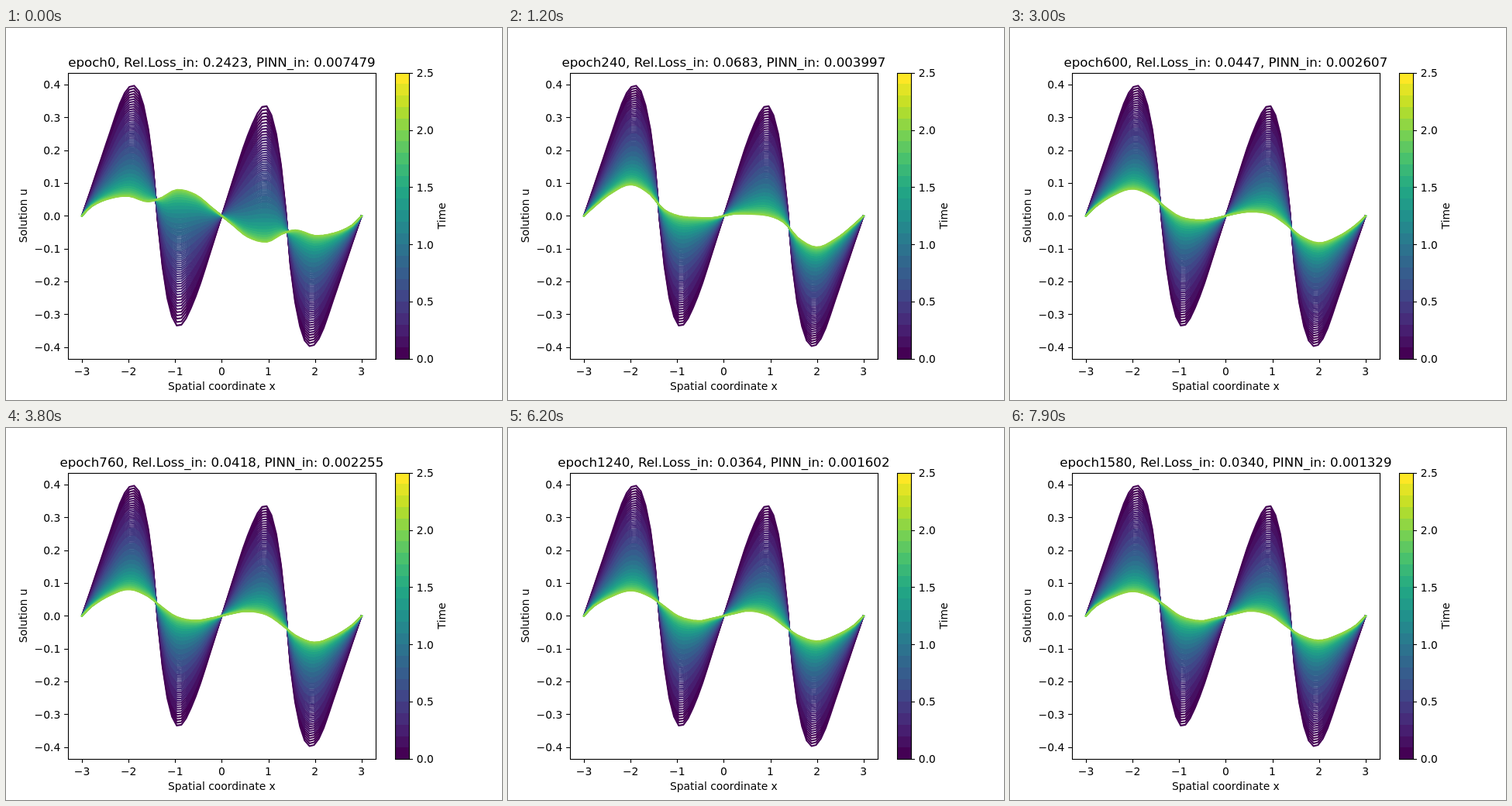
Animation of 640 by 480 pixels, one loop 8 s. Source, as an HTML page with a canvas:

```html
<!DOCTYPE html>
<html lang="en">
<head>
<meta charset="utf-8">
<title>Training progress</title>
<style>
  html, body { margin: 0; width: 100%; height: 100%; overflow: hidden; background: #fff; }
  canvas { display: block; }
</style>
</head>
<body>
<canvas id="stage" width="640" height="480"></canvas>
<script>
const ctx = document.getElementById('stage').getContext('2d');
const FONT = '"DejaVu Sans", sans-serif';
const BOX = { l: 80, r: 476.8, t: 57.6, b: 427.2 };
const BAR = { l: 501.6, r: 520.1 };
const MID_X = 278.4, MID_Y = 242.4, X_UNIT = 60.12, Y_UNIT = 423.2;
const POINTS = 60, LINES = 100, LEVELS = 25, DECAY = 1.15;
const STEPS = 80, STEP_MS = 100;

// Left half of the start wave, in pixels above zero; the right half mirrors it.
const START = [0, 18, 36, 54.5, 72.5, 91, 109, 127.5, 145, 158.5, 166.5, 168, 161, 142.5, 112,
  65, -8, -66, -106, -130, -141.5, -140.5, -132, -119, -104, -87, -68, -48.5, -29, -9.5];

// Learned end wave at chosen steps, given at the KNOTS positions.
const KNOTS = [98, 110, 132, 158, 182, 200, 220, 245, 265, 278.4];
const STAGES = [
  { step: 0,  loss: 0.2423, pinn: 0.007479, end: [0, 12, 22, 25.5, 18.5, 23, 33.5, 27, 11, 0] },
  { step: 12, loss: 0.0683, pinn: 0.003997, end: [0, 11, 28.5, 40.5, 29, 9, 0, -2.5, -2.5, 0] },
  { step: 19, loss: 0.0562, pinn: 0.003408, end: [0, 12, 28, 37.5, 26.5, 9, -2, -4, -2.5, 0] },
  { step: 30, loss: 0.0447, pinn: 0.002607, end: [0, 11.5, 26, 35, 26, 11.5, -1.5, -5.5, -3, 0] },
  { step: 46, loss: 0.0390, pinn: 0.001950, end: [0, 12, 25, 33.5, 26, 13, -1, -6.5, -3, 0] },
  { step: 62, loss: 0.0364, pinn: 0.001602, end: [0, 12, 24.5, 32.7, 25.5, 13.5, -0.5, -6.5, -3, 0] },
  { step: 79, loss: 0.0340, pinn: 0.001329, end: [0, 12, 24, 31.7, 25, 13.5, -0.5, -6.5, -3, 0] }
];

const VIRIDIS = ['440154', '482475', '414487', '355f8d', '2a788e', '21918c',
  '22a884', '44bf70', '7ad151', 'bddf26', 'fde725']
  .map(h => [0, 2, 4].map(i => parseInt(h.slice(i, i + 2), 16)));

const mix = (a, b, k) => a + (b - a) * k;
const snap = v => Math.floor(v + 0.5) + 0.5;
const px = x => MID_X + x * X_UNIT;
const py = u => MID_Y - u * Y_UNIT;

function color(level) {
  const v = level / (LEVELS - 1) * 10, i = Math.min(9, Math.floor(v));
  return `rgb(${VIRIDIS[i].map((c, j) => Math.round(mix(c, VIRIDIS[i + 1][j], v - i)))})`;
}

// Cubic Hermite curve through the knots.
function curve(ys, x) {
  const n = KNOTS.length;
  const slope = i => {
    const a = Math.max(0, i - 1), b = Math.min(n - 1, i + 1);
    return (ys[b] - ys[a]) / (KNOTS[b] - KNOTS[a]);
  };
  let i = 0;
  while (i < n - 2 && x > KNOTS[i + 1]) i++;
  const h = KNOTS[i + 1] - KNOTS[i], s = (x - KNOTS[i]) / h, r = 1 - s;
  return ys[i] * (1 + 2 * s) * r * r + slope(i) * h * s * r * r
    + ys[i + 1] * s * s * (3 - 2 * s) - slope(i + 1) * h * s * s * r;
}

function stateAt(step) {
  let i = 0;
  while (i < STAGES.length - 2 && step >= STAGES[i + 1].step) i++;
  const a = STAGES[i], b = STAGES[i + 1];
  let k = (step - a.step) / (b.step - a.step);
  if (i === 0) k = 1 - (1 - k) ** 2;
  const log = (p, q) => p * (q / p) ** k;
  return {
    loss: log(a.loss, b.loss),
    pinn: log(a.pinn, b.pinn),
    end: a.end.map((v, j) => mix(v, b.end[j], k))
  };
}

function text(str, x, y, align = 'center', size = 13.889) {
  ctx.font = `${size}px ${FONT}`;
  ctx.textAlign = align;
  ctx.fillStyle = '#000';
  ctx.fillText(str, x, y);
}

function upright(str, x, y) {
  ctx.save();
  ctx.translate(x, y);
  ctx.rotate(-Math.PI / 2);
  text(str, 0, 0);
  ctx.restore();
}

function line(x1, y1, x2, y2) {
  ctx.beginPath();
  ctx.moveTo(x1, y1);
  ctx.lineTo(x2, y2);
  ctx.stroke();
}

function frame(l, r) {
  const x = snap(l), y = snap(BOX.t);
  ctx.strokeRect(x, y, snap(r) - x, snap(BOX.b) - y);
}

function drawWaves(end) {
  const half = POINTS / 2, gap = 6 * X_UNIT / (POINTS - 1);
  const goal = START.map((_, i) => curve(end, px(-3) + i * gap));
  const floor = Math.exp(-2 * DECAY);
  ctx.lineWidth = 2.083;
  ctx.lineJoin = 'round';
  ctx.lineCap = 'square';
  for (let n = 0; n <= LINES; n++) {
    const time = 2 * n / LINES;
    const rest = (Math.exp(-DECAY * time) - floor) / (1 - floor);
    ctx.strokeStyle = color(Math.floor(time * 10 + 1e-6));
    ctx.beginPath();
    for (let i = 0; i < POINTS; i++) {
      const left = i < half, j = left ? i : POINTS - 1 - i;
      const u = mix(goal[j], START[j], rest);
      ctx.lineTo(px(-3) + i * gap, MID_Y - (left ? u : -u));
    }
    ctx.stroke();
  }
}

function drawAxes() {
  const tick = 4.86, height = BOX.b - BOX.t;
  ctx.strokeStyle = '#000';
  ctx.lineWidth = 1.11;
  ctx.lineJoin = 'miter';
  ctx.lineCap = 'butt';
  const sign = v => (v < 0 ? '\u2212' : '');
  for (let v = -3; v <= 3; v++) {
    const x = snap(px(v));
    line(x, BOX.b, x, BOX.b + tick);
    text(sign(v) + Math.abs(v), px(v), 448);
  }
  for (let v = -4; v <= 4; v++) {
    const y = snap(py(v / 10));
    line(BOX.l - tick, y, BOX.l, y);
    text(sign(v) + (Math.abs(v) / 10).toFixed(1), 70.3, Math.round(py(v / 10) + 5.2), 'right');
  }
  frame(BOX.l, BOX.r);
  text('Spatial coordinate x', MID_X, 467);
  upright('Solution u', 27, MID_Y);

  for (let i = 0; i < LEVELS; i++) {
    const top = Math.round(BOX.b - (i + 1) * height / LEVELS);
    const bottom = Math.round(BOX.b - i * height / LEVELS);
    ctx.fillStyle = color(i);
    ctx.fillRect(502, top, 18, bottom - top);
  }
  for (let i = 0; i <= 5; i++) {
    const y = BOX.b - i * height / 5;
    line(BAR.r, snap(y), BAR.r + tick, snap(y));
    text((i / 2).toFixed(1), 529.8, Math.round(y + 5.2), 'left');
  }
  frame(BAR.l, BAR.r);
  upright('Time', 567, MID_Y);
}

function draw(step) {
  const s = stateAt(step);
  ctx.fillStyle = '#fff';
  ctx.fillRect(0, 0, 640, 480);
  drawWaves(s.end);
  drawAxes();
  text(`epoch${step * 20}, Rel.Loss_in: ${s.loss.toFixed(4)}, PINN_in: ${s.pinn.toFixed(6)}`,
    MID_X, 50, 'center', 16.667);
}

let shown = -1;
const begin = performance.now();
function tick(now) {
  const step = Math.floor(Math.max(0, now - begin) / STEP_MS) % STEPS;
  if (step !== shown) draw(shown = step);
  requestAnimationFrame(tick);
}
tick(begin);
</script>
</body>
</html>
```
